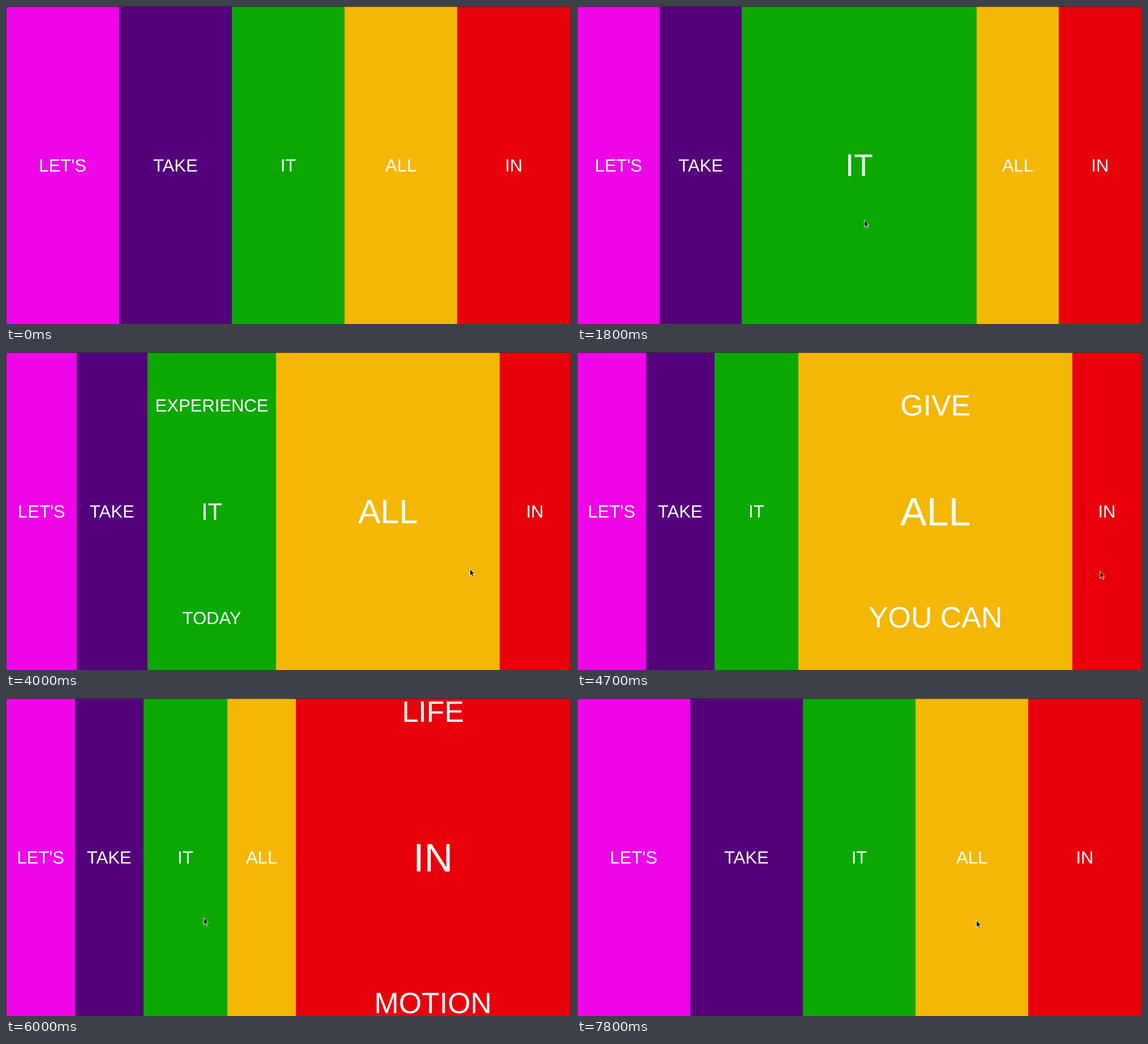
Animation, 998 px wide and 561 px high, one loop 8000 ms. Source, as an HTML page:

```html
<!DOCTYPE html>
<html lang="en">
<head>
<meta charset="utf-8">
<title>Flex panels</title>
<style>
  html, body { margin: 0; width: 100%; height: 100%; overflow: hidden; background: #333; }
  #stage {
    position: absolute; left: .5px; top: 1px; width: 996px; height: 562px;
    display: flex; overflow: hidden;
    color: #fff; font-family: "Liberation Sans", Arial, sans-serif;
    text-rendering: geometricPrecision;
  }
  #stage::after {
    content: ""; position: absolute; left: 0; top: 0; width: 100%; height: 1px;
    background: rgba(51, 51, 51, .5);
  }
  .panel { flex: 1 1 0; display: flex; flex-direction: column; }
  .panel p {
    flex: 1 1 0; margin: 0; display: flex; align-items: center; justify-content: center;
    white-space: nowrap; line-height: 1.15;
  }
  .panel p:nth-child(2) { font-size: 1.35em; }
  #cursor { position: absolute; left: 0; top: 0; overflow: visible; }
</style>
</head>
<body>
<div id="stage"></div>
<svg id="cursor" width="10" height="16">
  <path d="M.5 .5V13L3.2 10.4L5.2 15L7.2 14.1L5.2 9.6H8.8Z" fill="#111" stroke="#fff" stroke-width=".9"/>
</svg>
<script>
const LOOP = 8000, STEP = 100;
const SMALL = 23, LARGE = 51.9, OPEN_FLEX = 4;

const PANELS = [
  ["#ee05e8", "", "LET'S", ""],
  ["#54007b", "", "TAKE", ""],
  ["#0aa800", "EXPERIENCE", "IT", "TODAY"],
  ["#f4b705", "GIVE", "ALL", "YOU CAN"],
  ["#e8000b", "LIFE", "IN", "MOTION"]
];

// Each click opens one panel (or none) and closes the rest;
// outer words slide once the widths have settled.
const CLICKS = [
  { open: 2, at: 1200, duration: 673, slideAt: 1918 },
  { open: 3, at: 3340, duration: 715, slideAt: 4100 },
  { open: 4, at: 5075, duration: 700, slideAt: 5818 },
  { open: -1, at: 6700, duration: 700, slideAt: 7425 }
];
const SLIDE_DURATION = 500;

// time, x, y of the pointer tip
const POINTER = [
  [500, 640, 555], [1100, 507, 377], [2400, 507, 377], [2900, 819, 382],
  [4200, 819, 382], [4500, 919, 386], [4600, 919, 386], [4900, 932, 387],
  [5200, 932, 387], [5400, 887, 387], [5600, 887, 387], [5900, 366, 387],
  [6000, 349, 387], [6200, 296, 388], [6300, 296, 388], [6500, 644, 391],
  [7600, 644, 391], [7800, 705, 391.5], [8000, 705, 391.5]
];

function bezier(x1, y1, x2, y2) {
  const curve = (a, b, s) => 3 * a * s * (1 - s) ** 2 + 3 * b * s * s * (1 - s) + s ** 3;
  return x => {
    if (x <= 0) return 0;
    if (x >= 1) return 1;
    let low = 0, high = 1;
    for (let i = 0; i < 30; i++) {
      const mid = (low + high) / 2;
      if (curve(x1, x2, mid) < x) low = mid; else high = mid;
    }
    return curve(y1, y2, low);
  };
}
const growEase = bezier(.61, -.19, .7, -.11);
const slideEase = bezier(.25, .1, .25, 1);

const stage = document.getElementById("stage");
const cursor = document.getElementById("cursor");
const panels = PANELS.map(([color, ...words]) => {
  const panel = document.createElement("div");
  panel.className = "panel";
  panel.style.background = color;
  for (const word of words) {
    panel.appendChild(document.createElement("p")).textContent = word;
  }
  return stage.appendChild(panel);
});

// Follows one panel through all clicks: 0 is closed, 1 is open.
function openness(index, progress) {
  return CLICKS.reduce((value, click) =>
    value + ((click.open === index ? 1 : 0) - value) * progress(click), 0);
}

function placePointer(t) {
  const next = POINTER.findIndex(key => key[0] > t);
  cursor.style.display = next > 0 ? "block" : "none";
  if (next < 1) return;
  const [t0, x0, y0] = POINTER[next - 1], [t1, x1, y1] = POINTER[next];
  const k = (t - t0) / (t1 - t0);
  cursor.style.transform = `translate(${x0 + (x1 - x0) * k}px, ${y0 + (y1 - y0) * k}px)`;
}

function draw(t) {
  panels.forEach((panel, i) => {
    const size = openness(i, c => growEase((t - c.at) / c.duration));
    const slide = openness(i, c => slideEase((t - c.slideAt) / SLIDE_DURATION));
    panel.style.flexGrow = 1 + (OPEN_FLEX - 1) * size;
    panel.style.fontSize = SMALL + (LARGE - SMALL) * size + "px";
    panel.firstChild.style.transform = `translateY(${-100 * (1 - slide)}%)`;
    panel.lastChild.style.transform = `translateY(${100 * (1 - slide)}%)`;
  });
  placePointer(t);
}

const start = performance.now();
function tick() {
  const t = (performance.now() - start) % LOOP;
  draw(Math.floor(t / STEP) * STEP);
  requestAnimationFrame(tick);
}
tick();
</script>
</body>
</html>
```
